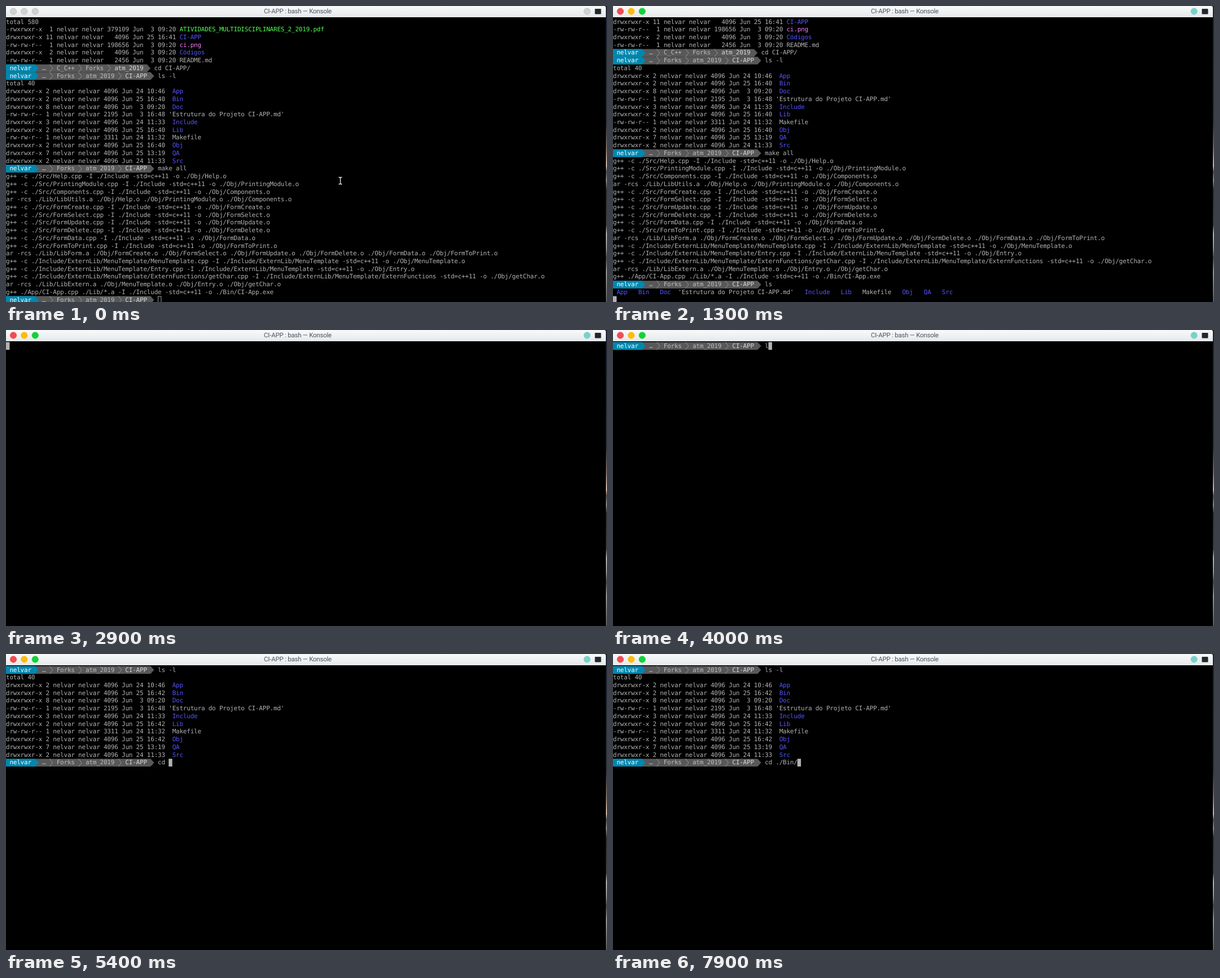
An HTML page for the animation above (8 s loop, 1065 by 526 pixels).

```html
<!DOCTYPE html>
<html lang="pt">
<head>
<meta charset="utf-8">
<title>Terminal</title>
<style>
  html, body { margin: 0; width: 100%; height: 100%; overflow: hidden; background: #000; }
  svg { display: block; width: 1065px; height: 526px; }
  #term text { font: 12px "DejaVu Sans Mono", monospace; letter-spacing: -.224px; white-space: pre; text-rendering: geometricPrecision; }
  #title { font: 11.5px Roboto, sans-serif; letter-spacing: -.24px; fill: #4a555f; text-anchor: middle; text-rendering: geometricPrecision; }
</style>
</head>
<body>
<svg viewBox="0 0 1065 526">
  <defs>
    <linearGradient id="bar" x2="0" y2="1">
      <stop stop-color="#f8f9fa"/><stop offset="1" stop-color="#e6e9eb"/>
    </linearGradient>
    <linearGradient id="desk" x2="0" y2="1">
      <stop stop-color="#1c2230"/><stop offset=".4" stop-color="#2b2f3a"/>
      <stop offset=".48" stop-color="#77675f"/><stop offset=".54" stop-color="#cfb8a6"/>
      <stop offset=".56" stop-color="#4a4a4c"/><stop offset=".59" stop-color="#8c8c8c"/>
      <stop offset=".62" stop-color="#2c2c2e"/><stop offset=".74" stop-color="#3a3a3c"/>
      <stop offset=".77" stop-color="#b4b4b4"/><stop offset=".82" stop-color="#8e8e8e"/>
      <stop offset=".85" stop-color="#444"/><stop offset=".9" stop-color="#999"/><stop offset="1" stop-color="#555"/>
    </linearGradient>
  </defs>
  <rect width="1065" height="526"/>
  <rect x="1063" width="2" height="526" fill="url(#desk)"/>
  <path d="M0 0H1060Q1063 0 1063 3V20H0Z" fill="url(#bar)"/>
  <text id="title" x="517" y="13">CI-APP : bash — Konsole</text>
  <g id="buttons"></g>
  <rect x="1043.5" y="5" width="11" height="9.5" rx="1" fill="#23272a"/>
  <g id="term" transform="translate(0 21.5) scale(.915)"></g>
  <path id="beam" d="M589.5 304.5h2l1 1 1-1h2M592.5 305v11M589.5 316.5h2l1-1 1 1h2" fill="none" stroke="#eee" stroke-width="1.3"/>
</svg>
<script>
const CW = 7, RH = 15, LOOP = 8000, USER = 'nelvar';
const FG = '#b2b2b2', BLUE = '#5454ff', GREEN = '#54ff54', PINK = '#ee7bee';
const $ = id => document.getElementById(id);

const text = (col, row, str, fill = FG) =>
  `<text x="${col * CW}" y="${row * RH + 11}" fill="${fill}">${str}</text>`;

// A line is a function of its row that returns markup.
const plain = str => row => text(0, row, str);

const nameColor = (name, dir) =>
  dir ? BLUE : /\.pdf$/.test(name) ? GREEN : /\.png$/.test(name) ? PINK : FG;

function entry(mode, links, size, date, name) {
  const head = `${mode} ${links} ${USER} ${USER} ${size} ${date} `;
  const pad = name.length - name.trimStart().length;
  return row => text(0, row, head) +
    text(head.length + pad, row, name.trim(), nameColor(name, mode[0] === 'd'));
}

// Shell prompt with arrow-shaped path segments, followed by a command.
function prompt(path, cmd) {
  return row => {
    let col = 9, labels = '', seps = '';
    path.forEach((part, i) => {
      const last = i === path.length - 1;
      labels += text(col + 1, row, part, last ? '#d8d8d8' : '#bcbcbc');
      col += part.length + 2;
      if (!last) seps += `M${col * CW + .5} 0l6 7.5-6 7.5`;
      col++;
    });
    const end = (col - 1) * CW;
    return `<g transform="translate(0 ${row * RH})">
      <path d="M0 0H${end}l7 7.5-7 7.5H0Z" fill="#585858"/>
      <path d="M0 0H56l7 7.5-7 7.5H0Z" fill="#0087af"/>
      <path d="${seps}" fill="none" stroke="#a4a4a4" stroke-width=".9"/></g>` +
      text(1, row, USER, '#fff') + labels + text(col + 1, row, cmd);
  };
}

const APP = ['…', 'Forks', 'atm_2019', 'CI-APP'];
const at = cmd => prompt(APP, cmd);
const DOC = "'Estrutura do Projeto CI-APP.md'";

const listing = built => {
  const dir = (n, date, name) => entry('drwxrwxr-x', n, 4096, 'Jun ' + date, ' ' + name);
  const file = (size, date, name) => entry('-rw-rw-r--', 1, size, 'Jun ' + date, name);
  return [
    plain('total 40'),
    dir(2, '24 10:46', 'App'),
    dir(2, '25 ' + built, 'Bin'),
    dir(8, ' 3 09:20', 'Doc'),
    file(2195, ' 3 16:48', DOC),
    dir(3, '24 11:33', 'Include'),
    dir(2, '25 ' + built, 'Lib'),
    file(3311, '24 11:32', ' Makefile'),
    dir(2, '25 ' + built, 'Obj'),
    dir(7, '25 13:19', 'QA'),
    dir(2, '24 11:33', 'Src')
  ];
};

const compile = (dir, name, inc = '') =>
  plain(`g++ -c ./${dir}/${name}.cpp -I ./Include${inc} -std=c++11 -o ./Obj/${name}.o`);
const src = name => compile('Src', name);
const archive = (lib, names) =>
  plain(`ar -rcs ./Lib/${lib}.a ` + names.map(n => `./Obj/${n}.o`).join(' '));

const utils = ['Help', 'PrintingModule', 'Components'];
const forms = ['Create', 'Select', 'Update', 'Delete', 'Data', 'ToPrint'].map(n => 'Form' + n);
const menu = '/ExternLib/MenuTemplate', ext = menu + '/ExternFunctions';

const history = [
  plain('total 580'),
  entry('-rwxrwxr-x', ' 1', '379109', 'Jun  3 09:20', 'ATIVIDADES_MULTIDISCIPLINARES_2_2019.pdf'),
  entry('drwxrwxr-x', '11', '  4096', 'Jun 25 16:41', 'CI-APP'),
  entry('-rw-rw-r--', ' 1', '198656', 'Jun  3 09:20', 'ci.png'),
  entry('drwxrwxr-x', ' 2', '  4096', 'Jun  3 09:20', 'Códigos'),
  entry('-rw-rw-r--', ' 1', '  2456', 'Jun  3 09:20', 'README.md'),
  prompt(['…', 'C_C++', 'Forks', 'atm_2019'], 'cd CI-APP/'),
  at('ls -l'),
  ...listing('16:40'),
  at('make all'),
  ...utils.map(src),
  archive('LibUtils', utils),
  ...forms.map(src),
  archive('LibForm', forms),
  compile('Include' + menu, 'MenuTemplate', menu),
  compile('Include' + menu, 'Entry', menu),
  compile('Include' + ext, 'getChar', ext),
  archive('LibExtern', ['MenuTemplate', 'Entry', 'getChar']),
  plain('g++ ./App/CI-App.cpp ./Lib/*.a -I ./Include -std=c++11 -o ./Bin/CI-App.exe')
];

const shortList = row => {
  let col = 1, out = '';
  for (const name of ['App', 'Bin', 'Doc', DOC, 'Include', 'Lib', 'Makefile', 'Obj', 'QA', 'Src']) {
    if (name === DOC) col--;
    out += text(col, row, name, nameColor(name, name !== DOC && name !== 'Makefile'));
    col += name.length + 3;
  }
  return out;
};

const listed = [...history.slice(2), at('ls'), shortList];
const fresh = [at('ls -l'), ...listing('16:42')];

// [start ms, lines above, typed command; null while the prompt is pending]
const steps = [
  [0, history, ''], [500, history, ''],
  [1100, history, 'l'], [1200, history, 'ls'],
  [1300, listed, null], [1400, listed, ''],
  [2200, listed, 'c'], [2400, listed, 'cl'], [2500, listed, 'cle'],
  [2600, listed, 'clea'], [2700, listed, 'clear'],
  [2900, [], null], [3000, [], ''],
  [4000, [], 'l'], [4100, [], 'ls'], [4200, [], 'ls -'], [4400, [], 'ls -l'],
  [4700, fresh, null], [4800, fresh, ''],
  [5200, fresh, 'c'], [5300, fresh, 'cd'], [5400, fresh, 'cd '],
  [6600, fresh, 'cd .'], [6700, fresh, 'cd ./'],
  [7800, fresh, 'cd ./B'], [7900, fresh, 'cd ./Bin/']
];

function drawButtons(active) {
  const dots = [[13, '#f24b53'], [32.3, '#fdbc0b'], [51.7, '#12d23a'], [1029.7, '#78d2c8']];
  $('buttons').innerHTML = dots.map(([x, c]) =>
    `<circle cx="${x}" cy="9.5" r="5.7" fill="${active ? c : '#d0d1d1'}"
      stroke="${active ? c : '#bcbdbd'}" stroke-width=".8"/>`).join('');
}

function draw([start, lines, cmd]) {
  const active = start >= 500, row = lines.length;
  const x = (cmd === null ? 0 : 42 + cmd.length) * CW, y = row * RH;
  const cursor = active
    ? `<rect x="${x}" y="${y}" width="${CW}" height="${RH}" fill="${FG}"/>`
    : `<rect x="${x + .5}" y="${y + .5}" width="${CW - 1}" height="${RH - 1}" fill="none" stroke="${FG}"/>`;
  $('term').innerHTML = lines.map((line, i) => line(i)).join('') +
    (cmd === null ? '' : at(cmd)(row)) + cursor;
  drawButtons(active);
  $('beam').style.display = active ? 'none' : '';
}

let shown;
const origin = performance.now();
function tick() {
  const t = Math.max(0, performance.now() - origin) % LOOP;
  const step = steps.findLast(s => s[0] <= t);
  if (step !== shown) draw(shown = step);
  requestAnimationFrame(tick);
}
tick();
</script>
</body>
</html>
```
